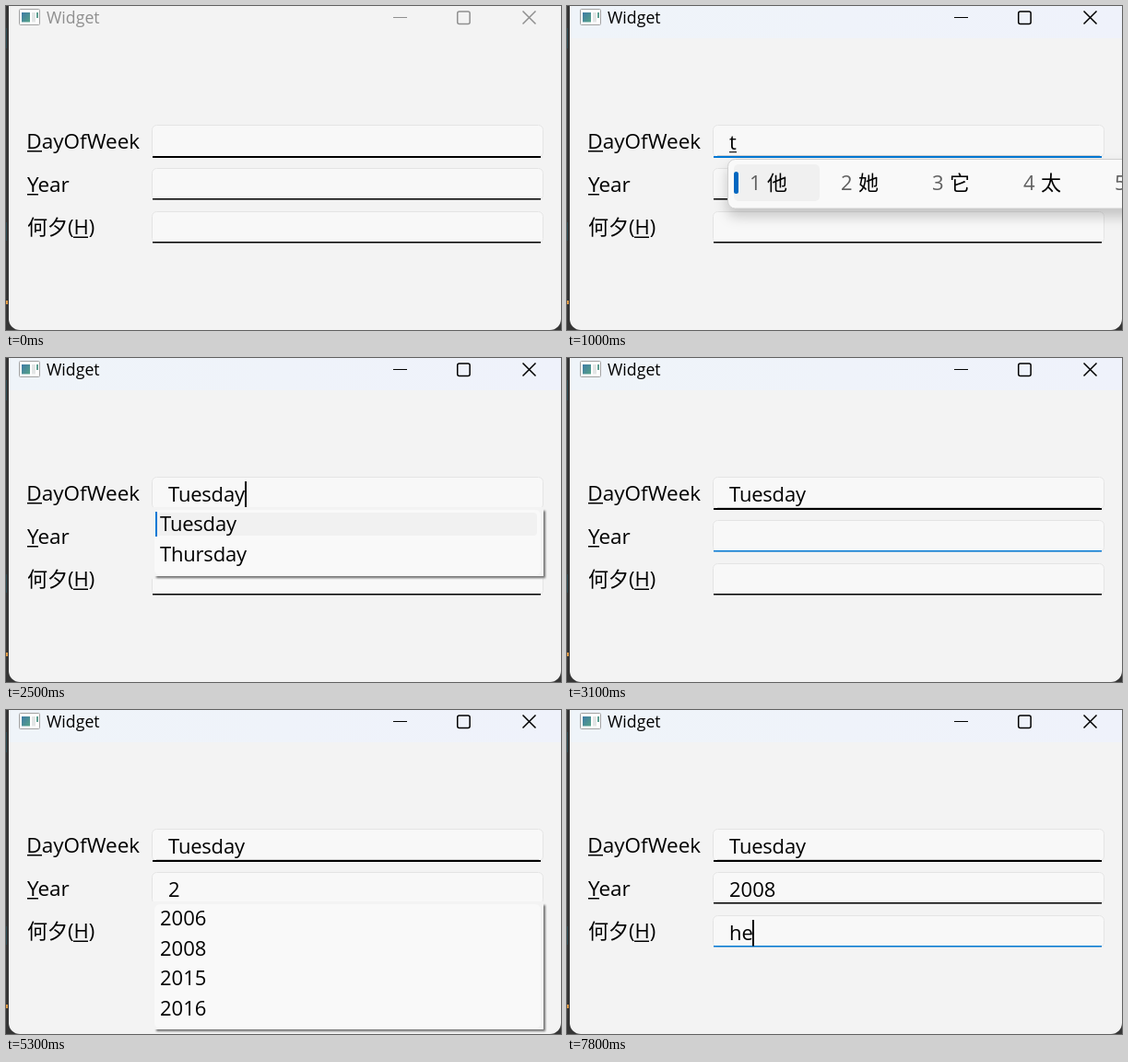
Write an HTML page that moves like this. It is 602 px wide and 352 px high and loops after 8000 ms.

```html
<!DOCTYPE html>
<html lang="zh-CN">
<head>
<meta charset="utf-8">
<title>Widget</title>
<style>
html, body { margin: 0; width: 100%; height: 100%; overflow: hidden; background: #353535; }
svg { display: block; width: 100%; height: 100%; }
text { font: 22px "Open Sans", "Noto Sans CJK SC", "Noto Sans CJK", sans-serif; fill: #000; white-space: pre; }
.label { font-size: 22.5px; }
.word { letter-spacing: -.2px; }
.box { fill: #f8f8f8; stroke: #e4e4e4; }
.panel { fill: #f3f3f3; filter: drop-shadow(2px 2px .8px rgba(0,0,0,.55)); }
.inner { fill: #f9f9f9; }
.row { fill: #f1f1f1; }
.bar { fill: #0078d4; }
.num { fill: #606060; }

/* Every part holds its state until the next key (8 s loop, 1.25% = 100 ms). */
.a { animation: 8s step-end infinite; }
.s { opacity: 0; }

.wake { color: #8f8f8f; animation-name: wake; }
.wake text { fill: currentColor; font-size: 17.7px; }
.mica { animation-name: mica; }
.ln { fill: #000; }
.ln1 { animation-name: ln1; }
.ln2 { animation-name: ln2; }
.ln3 { animation-name: ln3; }
.hover { animation-name: hover; }
.t { animation-name: t; }
.compose { animation-name: compose; }
.ime { animation-name: ime; }
.days { animation-name: days; }
.pickDay { animation-name: pickDay; }
.two { animation-name: two; }
.y06 { animation-name: y06; }
.y08 { animation-name: y08; }
.years { animation-name: years; }
.h { animation-name: h; }
.he { animation-name: he; }
.caret { animation-name: caret; }

@keyframes wake { 5% { color: #000; } }
@keyframes mica { 5% { opacity: 1; } }
@keyframes ln1 { 6.25% { fill: #0078d4; } 33.75% { fill: #000; } }
@keyframes ln2 { 33.75% { fill: #0078d4; } 87.5% { fill: #000; } }
@keyframes ln3 { 87.5% { fill: #0078d4; } }
@keyframes hover { 2.5% { opacity: 1; } }
@keyframes t { 11.25% { opacity: 1; } 31.25% { opacity: 0; } }
@keyframes compose { 11.25% { opacity: 1; } 16.25% { opacity: 0; } }
@keyframes ime { 12.5% { opacity: 1; } 16.25% { opacity: 0; } }
@keyframes days { 17.5% { opacity: 1; } 32.5% { opacity: 0; } }
@keyframes pickDay { 31.25% { opacity: 1; } }
@keyframes two { 60% { opacity: 1; } 68.75% { opacity: 0; } }
@keyframes y06 { 68.75% { opacity: 1; } 71.25% { opacity: 0; } }
@keyframes y08 { 71.25% { opacity: 1; } }
@keyframes years { 60% { opacity: 1; } 77.5% { opacity: 0; } }
@keyframes h { 96.25% { opacity: 1; } 97.5% { opacity: 0; } }
@keyframes he { 97.5% { opacity: 1; } }
@keyframes caret {
  5% { opacity: 1; transform: translate(176px, 134px); }
  11.25% { opacity: 0; }
  17.5% { opacity: 1; transform: translate(184px, 134px); }
  23.75% { opacity: 0; }
  30% { opacity: 1; }
  31.25% { opacity: 1; transform: translate(259px, 134px); }
  32.5% { opacity: 1; transform: translate(176px, 181px); }
  38.75% { opacity: 0; }
  45% { opacity: 1; }
  51.25% { opacity: 0; }
  57.5% { opacity: 1; }
  60% { opacity: 1; transform: translate(188px, 181px); }
  66.25% { opacity: 0; }
  72.5% { opacity: 1; transform: translate(226px, 181px); }
  85% { opacity: 0; }
  87.5% { opacity: 1; transform: translate(176px, 228px); }
  93.75% { opacity: 0; }
  96.25% { opacity: 1; transform: translate(189px, 228px); }
  97.5% { opacity: 1; transform: translate(201px, 228px); }
}
</style>
</head>
<body>
<svg viewBox="0 0 602 352" preserveAspectRatio="none">
  <defs>
    <linearGradient id="tint">
      <stop offset="0" stop-color="#eff4f9"/>
      <stop offset="1" stop-color="#eff2fb"/>
    </linearGradient>
    <linearGradient id="teal" x2="1" y2="1">
      <stop offset="0" stop-color="#3f7ba6"/>
      <stop offset="1" stop-color="#55a287"/>
    </linearGradient>
  </defs>

  <!-- desktop edge and window -->
  <rect width="602" height="352" fill="#353535"/>
  <path d="M0 24h1v22H0zM0 235h1v20H0z" fill="#2c4a52"/>
  <path d="M0 320h2v4H0z" fill="#e09a45"/>
  <path d="M3 0H602V340a12 12 0 0 1-12 12H15a12 12 0 0 1-12-12z" fill="#f3f3f3"/>
  <rect class="a s mica" x="3" width="599" height="35" fill="url(#tint)"/>

  <!-- title bar -->
  <rect x="14.5" y="3.5" width="22" height="17" rx="1" fill="#fff" stroke="#a2a2a2"/>
  <rect x="17" y="7" width="9" height="10.5" fill="url(#teal)"/>
  <rect x="28" y="7" width="4" height="10.5" fill="#e3e6e6"/>
  <rect x="33" y="7" width="2" height="6" fill="#5f9f92"/>
  <g class="a wake">
    <text x="44" y="19">Widget</text>
    <g fill="none" stroke="currentColor" stroke-width="1.5">
      <path d="M420 12.5h15" stroke-width="1"/>
      <rect x="489.7" y="6" width="13.4" height="13.4" rx="2"/>
      <path d="M560.5 5.5l14 14m0-14l-14 14"/>
    </g>
  </g>

  <!-- form -->
  <text class="label" x="22.3" y="155">DayOfWeek</text>
  <text class="label" x="23" y="202">Year</text>
  <text x="23" y="248.3">何夕(H)</text>
  <path d="M23 157h16v1.4H23zM23 204h12v1.4H23zM73 250.5h16v1.4H73z"/>

  <rect class="box" x="158.5" y="129.5" width="424" height="34.5" rx="5"/>
  <rect class="box" x="158.5" y="176.5" width="424" height="34" rx="5"/>
  <rect class="box" x="158.5" y="223.5" width="424" height="34" rx="5"/>
  <rect class="a s hover" x="163" y="162" width="415" height="1" fill="#cfcfcf"/>
  <rect class="a ln ln1" x="159" y="163" width="421" height="2"/>
  <rect class="a ln ln2" x="159" y="209" width="421" height="1.5"/>
  <rect class="a ln ln3" x="159" y="256" width="421" height="1.5"/>

  <!-- typed text -->
  <text class="a s t" x="176" y="156">t</text>
  <rect class="a s compose" x="176" y="158" width="8" height="1.3" fill="#222"/>
  <text class="a s pickDay word" x="176" y="156">Tuesday</text>
  <text class="a s two" x="176" y="203">2</text>
  <text class="a s y06" x="176" y="203">2006</text>
  <text class="a s y08" x="176" y="203">2008</text>
  <text class="a s h" x="176" y="250">h</text>
  <text class="a s he" x="176" y="250">he</text>
  <rect class="a s caret" width="2" height="28.5"/>

  <!-- input method candidates -->
  <g class="a s ime">
    <rect x="174.5" y="166.5" width="460" height="53.5" rx="8" fill="#f9f9f9" stroke="#cfcfcf"
      style="filter:drop-shadow(0 8px 7px rgba(0,0,0,.2))"/>
    <rect x="181" y="172" width="93" height="40" rx="5" fill="#f0f0f0"/>
    <rect x="181" y="180" width="5" height="24" rx="2.5" fill="#0067c0"/>
    <text x="198" y="200"><tspan class="num">1</tspan><tspan x="217">他</tspan></text>
    <text x="297" y="200"><tspan class="num">2</tspan><tspan x="316">她</tspan></text>
    <text x="396" y="200"><tspan class="num">3</tspan><tspan x="415">它</tspan></text>
    <text x="495" y="200"><tspan class="num">4</tspan><tspan x="514">太</tspan></text>
    <text class="num" x="594" y="200">5</text>
  </g>

  <!-- completion lists -->
  <g class="a s days">
    <rect x="158" y="162" width="428" height="78" fill="#f3f3f3"/>
    <rect class="panel" x="161" y="164" width="422" height="73"/>
    <rect class="inner" x="161" y="165" width="419" height="71" rx="6"/>
    <g class="a s pickDay">
      <rect class="row" x="162" y="168" width="414" height="25" rx="4"/>
      <rect class="bar" x="162" y="167" width="2" height="27"/>
    </g>
    <text class="word" x="167" y="188">Tuesday</text>
    <text class="word" x="167" y="221">Thursday</text>
  </g>
  <g class="a s years">
    <rect x="158" y="208" width="428" height="142" fill="#f3f3f3"/>
    <rect class="panel" x="161" y="210" width="422" height="137"/>
    <rect class="inner" x="161" y="211" width="419" height="135" rx="6"/>
    <g class="a s y06">
      <rect class="row" x="162" y="214" width="414" height="25" rx="4"/>
      <rect class="bar" x="162" y="213" width="2" height="27"/>
    </g>
    <g class="a s y08">
      <rect class="row" x="162" y="247" width="414" height="25" rx="4"/>
      <rect class="bar" x="162" y="246" width="2" height="27"/>
    </g>
    <text x="167" y="234">2006</text>
    <text x="167" y="267">2008</text>
    <text x="167" y="299">2015</text>
    <text x="167" y="332">2016</text>
  </g>
</svg>
</body>
</html>
```
